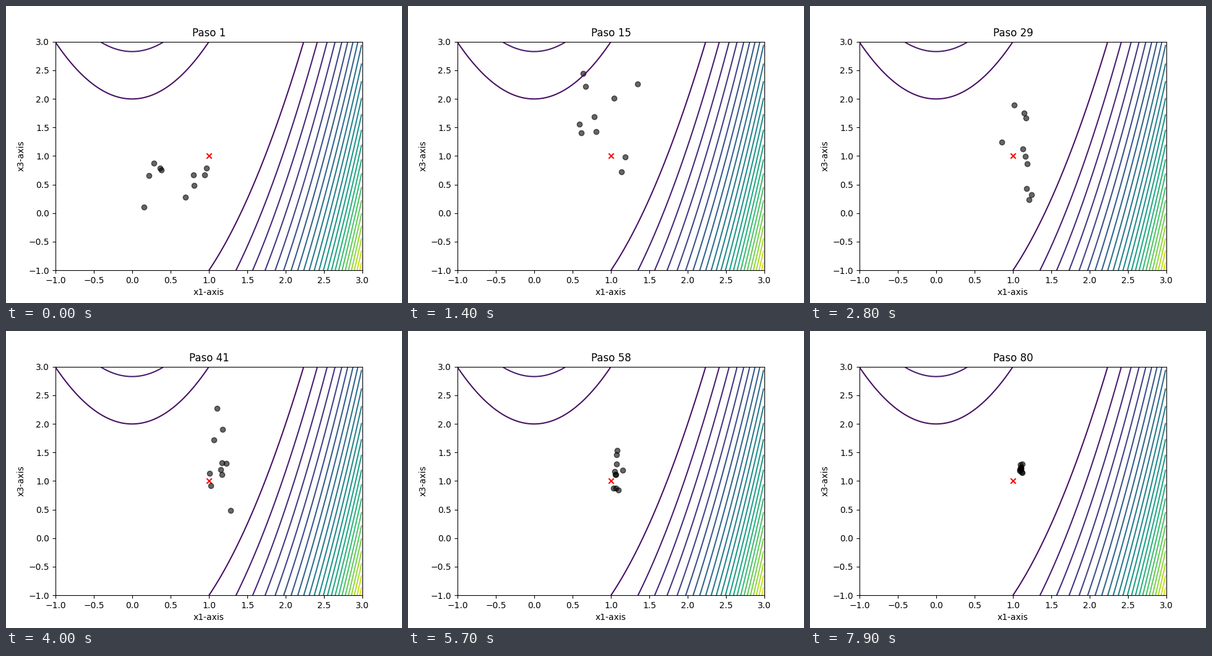
Recreate the animation shown at these times as a matplotlib script. Size 640 by 480 pixels, loop 8000 ms.

```python
import matplotlib.pyplot as plt
import numpy as np
from matplotlib.animation import FuncAnimation

STEPS = 80
START = np.array([
    (0.15, 0.11), (0.22, 0.66), (0.28, 0.87), (0.36, 0.79), (0.38, 0.76),
    (0.69, 0.28), (0.81, 0.48), (0.80, 0.67), (0.94, 0.67), (0.97, 0.79),
])


def center(k):
    """The swarm's middle settles in the valley, bobbing on the way."""
    x = 1.09 - 0.54 * np.exp(-k / 8)
    y = 1.36 - (0.3 + 0.4 * np.cos(2 * np.pi * k / 27)) * np.exp(-k / 45)
    return np.stack([x, y], axis=-1)


def spread(k):
    x = 0.45 * np.exp(-k / 25)
    y = 0.5 * np.minimum(1, 0.4 + k / 15) * np.minimum(1, np.exp((40 - k) / 17))
    return np.stack([x, y], axis=-1)


def swarm():
    """Positions by step, particle and axis: damped orbits from START."""
    rng = np.random.default_rng(7)
    radius = rng.uniform(0.4, 2.2, START.shape)
    phase = rng.uniform(0, 2 * np.pi, START.shape)
    rate = 2 * np.pi / rng.uniform(8, 15, START.shape)
    k = np.arange(STEPS)
    orbit = radius * np.sin(rate * k[:, None, None] + phase)
    pos = center(k)[:, None] + spread(k)[:, None] * orbit
    return pos + (START - pos[0]) * np.exp(-k / 4)[:, None, None]


path = swarm()

fig, ax = plt.subplots(figsize=(6.4, 4.8), dpi=100)
grid = np.arange(-1, 3, 0.01)
x1, x3 = np.meshgrid(grid, grid)
cost = 100 * (x3 - x1**2) ** 2 + (1 - x1) ** 2
ax.contour(x1, x3, cost, levels=np.arange(0, 10001, 400))
ax.scatter(1, 1, color="red", marker="x")
dots = ax.scatter(*path[0].T, color="black", alpha=0.6)
ax.set(xlim=(-1, 3), ylim=(-1, 3), xlabel="x1-axis", ylabel="x3-axis")
title = ax.set_title("Paso 1")


def update(step):
    dots.set_offsets(path[step])
    title.set_text(f"Paso {step + 1}")
    return dots, title


anim = FuncAnimation(fig, update, frames=STEPS, interval=100,
                     repeat=True, repeat_delay=0, blit=False)
plt.show()
```
